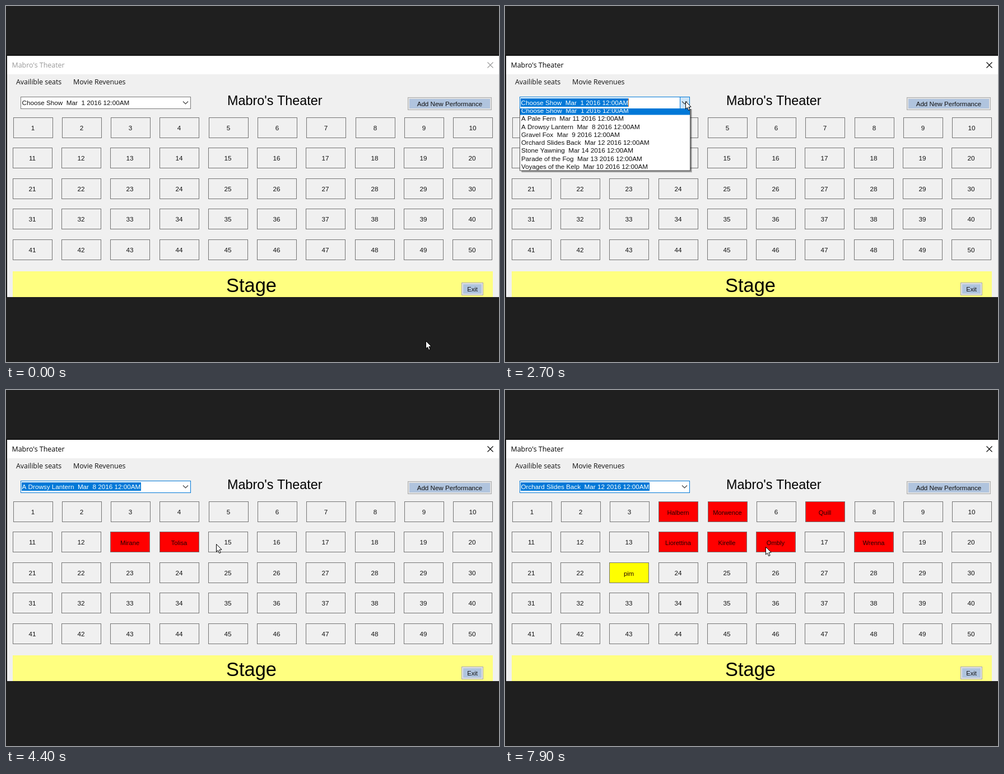
Recreate the animation shown at these times as an HTML page with a canvas. Size 880 by 636 pixels, loop 8000 ms.

```html
<!DOCTYPE html>
<html lang="en">
<head>
<meta charset="utf-8">
<title>Theater seating</title>
<style>
html, body { margin: 0; width: 100%; height: 100%; overflow: hidden; background: #1f1f1f; }
canvas { display: block; }
</style>
</head>
<body>
<canvas id="stage" width="880" height="636"></canvas>
<script>
const ctx = document.getElementById('stage').getContext('2d');
const LOOP = 8000, STEP = 100;
const SANS = '"Liberation Sans", Arial, sans-serif';
const UI = '"Open Sans", "Noto Sans", sans-serif';
const BLUE = '#0078d7', FACE = '#f0f0f0', INK = '#111';
const ROW = 14.28;

const shows = [
  'Choose Show  Mar  1 2016 12:00AM',
  'A Pale Fern  Mar 11 2016 12:00AM',
  'A Drowsy Lantern  Mar  8 2016 12:00AM',
  'Gravel Fox  Mar  9 2016 12:00AM',
  'Orchard Slides Back  Mar 12 2016 12:00AM',
  'Stone Yawning  Mar 14 2016 12:00AM',
  'Parade of the Fog  Mar 13 2016 12:00AM',
  'Voyages of the Kelp  Mar 10 2016 12:00AM'
];

const bookings = {
  2: { 13: 'Mirane', 14: 'Tolisa' },
  3: { 3: 'Nellu', 8: 'Gavorinne', 9: 'Hartovius', 10: 'Pellie',
       11: 'Brimoselle', 12: 'Tavrin', 13: 'Sorabee', 15: 'Vandiro' },
  4: { 4: 'Halbern', 5: 'Morwence', 7: 'Quill', 14: 'Liorettina',
       15: 'Kirelle', 16: 'Ombly', 18: 'Wrenna', 23: 'pim' }
};

// Pointer stops: time, x, y
const path = [
  [0, 749, 598], [400, 500, 370], [700, 300, 172], [800, 268, 124], [900, 268, 124],
  [1400, 255, 196], [1600, 258, 211], [1800, 278, 203], [2500, 322, 170], [2700, 322, 170],
  [3100, 298, 208], [3200, 298, 208], [3700, 255, 221], [4100, 257, 225],
  [4400, 375, 275], [4500, 375, 275], [4900, 449, 310], [5300, 294, 176], [6700, 294, 176],
  [7200, 234, 300], [7600, 393, 314], [7900, 465, 280]
];
const caretOn = [[2600, 3100], [3300, 3600], [4100, 4300], [4800, 5300], [5600, 6600], [7100, 7700]];
const hoverOn = [[700, 1000], [1200, 1500], [1800, 2600]];

const within = (t, spans) => spans.some(([a, b]) => t >= a && t < b);

function pointerAt(t) {
  const i = path.findIndex(p => p[0] > t);
  if (i < 0) return path[path.length - 1].slice(1);
  const [t0, x0, y0] = path[i - 1], [t1, x1, y1] = path[i];
  const k = (t - t0) / (t1 - t0);
  return [x0 + (x1 - x0) * k, y0 + (y1 - y0) * k];
}

function box(x, y, w, h, fill, edge) {
  if (edge) {
    ctx.fillStyle = edge;
    ctx.fillRect(x, y, w, h);
    x++; y++; w -= 2; h -= 2;
  }
  ctx.fillStyle = fill;
  ctx.fillRect(x, y, w, h);
}

function text(s, x, y, size, color = INK, align = 'left', family = SANS) {
  ctx.font = size + 'px ' + family;
  ctx.textAlign = align;
  ctx.fillStyle = color;
  ctx.fillText(s, x, y);
}

function line(points, color, width) {
  ctx.beginPath();
  points.forEach(([x, y]) => ctx.lineTo(x, y));
  ctx.strokeStyle = color;
  ctx.lineWidth = width;
  ctx.stroke();
}

function button(x, y, w, h, label, size) {
  box(x, y, w, h, '#e1e1e1', '#adadad');
  box(x + 3, y + 3, w - 6, h - 6, '#b0c4de');
  text(label, x + w / 2, y + h / 2 + 4.5, size, INK, 'center');
}

function drawWindow(active) {
  box(0, 0, 880, 636, '#1f1f1f');
  box(0, 87, 880, 2, '#121212');
  box(0, 87, 2, 434, '#121212');
  box(2, 89, 878, 431, FACE);
  box(2, 89, 878, 33, '#fff');
  const ink = active ? '#000' : '#999';
  text("Mabro's Theater", 10.5, 109.5, 12.4, ink, 'left', UI);
  line([[859.5, 100.5], [869.5, 110.5]], ink, 1.1);
  line([[869.5, 100.5], [859.5, 110.5]], ink, 1.1);
  text('Availible seats', 18, 139.5, 12.4, INK, 'left', UI);
  text('Movie Revenues', 120, 139.5, 12.4, INK, 'left', UI);
  text("Mabro's Theater", 395, 177, 23.4, '#000');
  button(717, 163, 150, 23, 'Add New Performance', 11.6);
  box(12, 474, 857, 46, '#ffff80');
  text('Stage', 438, 510.5, 34.4, '#000', 'center');
  button(813, 494, 39, 23, 'Exit', 11.2);
}

function drawSeats(taken) {
  for (let n = 1; n <= 50; n++) {
    const col = (n - 1) % 10, row = Math.floor((n - 1) / 10);
    const x = Math.round((row ? 11.6 : 12.5) + 87.3 * col);
    const y = Math.round(198.5 + 54.5 * row);
    const name = taken[n];
    const fill = !name ? FACE : n === 23 ? '#ff0' : '#f00';
    box(x, y, 71, 37, fill, '#747474');
    if (name) text(name, x + 35, y + 24, 11.2, '#200', 'center');
    else text(n, x + 35, y + 23, 11.7, INK, 'center');
  }
}

function drawCombo(t, show, focused, open, onButton) {
  const edge = focused ? BLUE : within(t, hoverOn) ? '#333' : '#7a7a7a';
  box(26, 162, 304, 22, '#fff', edge);
  if (open || (focused && onButton)) box(312, 162, 18, 22, open ? '#cce4f7' : '#e5f1fb', BLUE);
  line([[316, 170.5], [320.5, 175], [325, 170.5]], '#444', 1.2);
  ctx.font = '11.7px ' + SANS;
  const width = ctx.measureText(shows[show]).width;
  if (focused) box(28, 165, Math.round(width) + 1, 15, BLUE);
  text(shows[show], 28.5, 176.5, 11.7, focused ? '#fff' : INK);
  if (focused && within(t, caretOn)) box(28 + Math.round(width), 165, 1, 15, '#ff8728');
}

function drawList(t, y) {
  const slide = t < 2700 ? 60 : t < 2800 ? 5.5 : 0;
  const hit = Math.floor((y - 185.5) / ROW);
  const hot = hit >= 0 && hit < shows.length ? hit : 0;
  ctx.save();
  ctx.beginPath();
  ctx.rect(0, 184, 880, 300);
  ctx.clip();
  ctx.translate(0, -slide);
  box(30, 187, 304, 116, 'rgba(0,0,0,.16)');
  box(29, 186, 304, 116, 'rgba(0,0,0,.3)');
  box(26, 184, 305, 116, '#fff', slide ? '#555' : BLUE);
  shows.forEach((s, i) => {
    const top = 185.5 + i * ROW;
    if (i === hot) box(27, Math.round(top), 303, 14, BLUE);
    text(s, 29, top + 11, 11.7, i === hot ? '#fff' : INK);
  });
  ctx.restore();
}

function drawPointer(x, y, beam) {
  ctx.save();
  ctx.translate(Math.round(x), Math.round(y));
  if (beam) {
    box(0, -6, 1, 13, '#000');
    for (const end of [-7, 7]) {
      box(-3, end, 3, 1, '#000');
      box(1, end, 3, 1, '#000');
    }
  } else {
    ctx.translate(0.5, 0.5);
    ctx.beginPath();
    [[0, 0], [0, 13.5], [3, 10.8], [5.2, 16], [7.6, 15], [5.4, 10], [9.6, 9.6]]
      .forEach(([px, py]) => ctx.lineTo(px, py));
    ctx.closePath();
    ctx.fillStyle = '#fff';
    ctx.fill();
    ctx.strokeStyle = '#000';
    ctx.lineWidth = 1;
    ctx.stroke();
  }
  ctx.restore();
}

function draw(t) {
  const show = t < 4100 ? 0 : t < 5600 ? 2 : t < 6100 ? 3 : 4;
  const focused = t >= 2600, open = focused && t < 4100;
  const [x, y] = pointerAt(t);
  const inCombo = x > 26 && x < 330 && y > 162 && y < 184;
  drawWindow(focused);
  drawSeats(bookings[show] || {});
  drawCombo(t, show, focused, open, inCombo && x > 312);
  if (open) drawList(t, y);
  drawPointer(x, y, inCombo && x <= 312 && !open);
}

const start = performance.now();
function tick() {
  const t = (performance.now() - start) % LOOP;
  draw(Math.floor(t / STEP) * STEP);
  requestAnimationFrame(tick);
}
tick();
</script>
</body>
</html>
```
